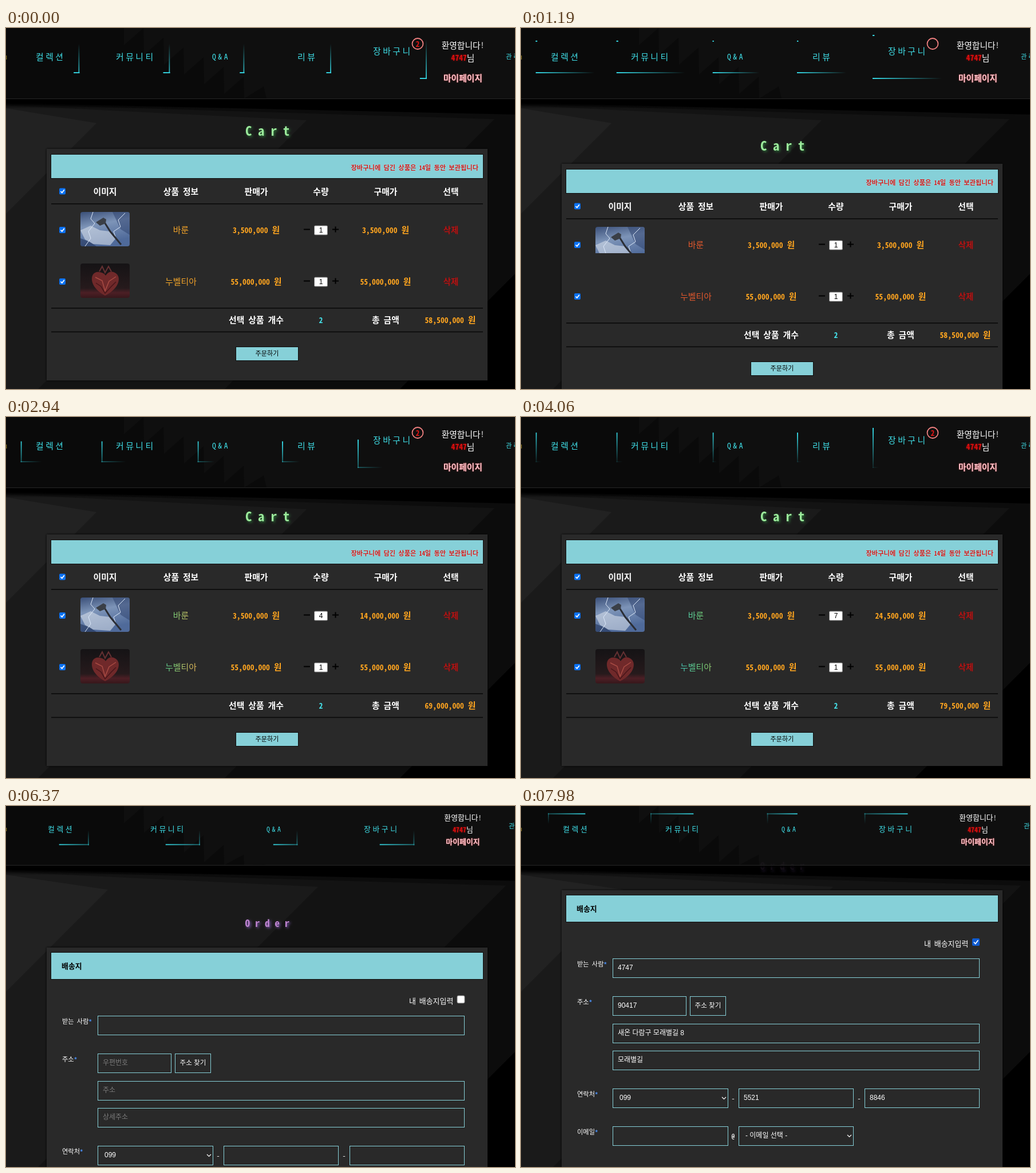
Write an HTML page with a canvas that moves like this. It is 889 by 630 pixels and loops after 8 s.

```html
<!DOCTYPE html>
<html lang="ko">
<head>
<meta charset="utf-8">
<title>Cart</title>
<style>
  html, body { margin: 0; width: 100%; height: 100%; overflow: hidden; background: #000; }
  canvas { display: block; width: 889px; height: 630px; }
</style>
</head>
<body>
<canvas id="stage" width="889" height="630"></canvas>
<script>
const ctx = document.getElementById('stage').getContext('2d');
const W = 889, H = 630, LOOP = 8000, STEP = 70, RATE = 20 / 21;
const RELOAD = 1190, READY = 1330, ORDER = 5880, ORDER_READY = 6020;
const MONO = '"Noto Sans Mono CJK KR", "Noto Sans CJK KR", monospace';
const SANS = '"Liberation Sans", "Noto Sans CJK KR", sans-serif';
const HANGUL_SCALE = 1 / 0.92; // makes a syllable exactly two Latin cells wide
const CYAN = '#3fdde6', AQUA = '#86d0d8', CARD = '#292929', GOLD = '#ffa51f';
const USER = '4747', STREET = '모래별길';

const clamp = (v, a = 0, b = 1) => Math.min(b, Math.max(a, v));
const smooth = (t, a, b) => { const p = clamp((t - a) / (b - a)); return p * p * (3 - 2 * p); };
const won = n => n.toLocaleString('en-US') + ' 원';

function rect(x, y, w, h, color) {
  ctx.fillStyle = color;
  ctx.fillRect(x, y, w, h);
}

function poly(color, ...pts) {
  ctx.fillStyle = color;
  ctx.beginPath();
  for (let i = 0; i < pts.length; i += 2) ctx.lineTo(pts[i], pts[i + 1]);
  ctx.fill();
}

function line(color, width, ...pts) {
  ctx.strokeStyle = color;
  ctx.lineWidth = width;
  ctx.beginPath();
  for (let i = 0; i < pts.length; i += 2) ctx.lineTo(pts[i], pts[i + 1]);
  ctx.stroke();
}

function text(s, x, y, size, color, o = {}) {
  const { weight = 400, font = MONO, align = 'left', gap = 0 } = o;
  ctx.save();
  ctx.textBaseline = 'middle';
  ctx.letterSpacing = gap + 'px';
  ctx.fillStyle = color;
  if (o.glow) {
    ctx.shadowColor = o.glow;
    ctx.shadowBlur = o.blur || 4;
    ctx.shadowOffsetX = ctx.shadowOffsetY = o.drop || 0;
  }
  const runs = String(s).match(/[가-힣]+|[^가-힣]+/g) || [];
  const setFont = run => {
    const scale = font === MONO && /[가-힣]/.test(run) ? HANGUL_SCALE : 1;
    ctx.font = `${weight} ${size * scale}px ${font}`;
  };
  const widths = runs.map(run => { setFont(run); return ctx.measureText(run).width; });
  const total = widths.reduce((a, b) => a + b, 0);
  if (align === 'center') x -= total / 2;
  if (align === 'right') x -= total;
  runs.forEach((run, i) => {
    setFont(run);
    ctx.fillText(run, x, y);
    x += widths[i];
  });
  ctx.restore();
}
const bold = (s, x, y, size, color, align = 'center', o = {}) =>
  text(s, x, y, size, color, { weight: 700, align, ...o });

// Milliseconds since the visible page was loaded
function pageAge(t) {
  if (t < RELOAD) return 525 + t * RATE;
  if (t < READY) return 7;
  if (t < ORDER) return 377 + (t - READY) * RATE;
  if (t < ORDER_READY) return 7;
  return 300 + (t - ORDER_READY) * RATE;
}

// Diagonal bands, cut off at the top by the header's shadow
function backdrop(head) {
  rect(0, 0, W, H, '#000');
  const bands = [[1318, '#0c0c0c', 8], [1012, '#131313', 10], [686, '#1a1a1a', 12], [324, '#222', 17]];
  for (const [d, c, top] of bands) {
    const y = head + top + 26;
    poly(c, 0, head + top, d - y, y, 0, d);
  }
}

function header(head) {
  const shade = ctx.createLinearGradient(0, head, 0, head + 18);
  shade.addColorStop(0, '#000');
  shade.addColorStop(0.45, 'rgba(0,0,0,.88)');
  shade.addColorStop(1, 'rgba(0,0,0,0)');
  rect(0, head, W, 18, shade);
  rect(0, 0, W, head, 'rgba(16,16,16,.96)');
  const teeth = [0, head, 0, 0, 206, 0];
  for (let i = 0; i < 7; i++) {
    const x = 206 + i * 35, y = i * 17;
    teeth.push(x, Math.min(head, y + 30), x + 34, Math.min(head, y));
  }
  teeth.push(455, head);
  poly('rgba(11,11,11,.9)', ...teeth);
  rect(0, head, W, 1, '#262626');
}

// Four bright segments chase each other around a box
function snake(x, y, w, h, age) {
  ctx.save();
  ctx.beginPath();
  ctx.rect(x, y, w, h);
  ctx.clip();
  const sides = [
    [x, y + 1, w, 0], [x + w - 1, y, 0, h],
    [x + w, y + h - 1, -w, 0], [x + 1, y + h, 0, -h]
  ];
  sides.forEach(([sx, sy, dx, dy], i) => {
    const local = age - 250 * i;
    if (local < 0 && i !== 2) return;
    const p = local < 0 ? 0.5 : Math.min(1, (local % 1000) / 500);
    const a = 2 * p - 1, b = 2 * p;
    const from = [sx + dx * a, sy + dy * a], to = [sx + dx * b, sy + dy * b];
    const g = ctx.createLinearGradient(...from, ...to);
    g.addColorStop(0, 'rgba(47,211,224,0)');
    g.addColorStop(1, '#35d6e2');
    line(g, 2, ...from, ...to);
  });
  ctx.restore();
}

function nav(items, size, age) {
  for (const [label, tx, x, y, w, h, ty] of items) {
    text(label, tx, ty, size, CYAN, { gap: 3.5 });
    snake(x, y, w, h, age);
  }
}

function greeting(x, size, rows) {
  text('환영합니다!', x, rows[0], size, '#fff', { align: 'center' });
  const left = x - size * 1.5;
  bold(USER, left, rows[1], size, '#dc1010', 'left', { glow: '#900', blur: 3 });
  text('님', left + size * 2, rows[1], size, '#fff');
  bold('마이페이지', x, rows[2], size, '#ffc4cc', 'center', { glow: '#a33', blur: 2 });
}

function checkbox(cx, cy, size, on, hover) {
  const r = size / 2;
  ctx.beginPath();
  ctx.roundRect(cx - r, cy - r, size, size, 2);
  ctx.fillStyle = on ? (hover ? '#0f5bd0' : '#0b72f5') : '#fff';
  ctx.fill();
  if (on) {
    line('#fff', 1.8, cx - r * .55, cy, cx - r * .12, cy + r * .45, cx + r * .6, cy - r * .5);
  } else {
    ctx.strokeStyle = hover ? '#555' : '#888';
    ctx.lineWidth = 1;
    ctx.stroke();
  }
}

const TINTS = [[224, 86, 44], [240, 166, 40], [214, 180, 92], [104, 204, 120], [54, 192, 208]];
function tint(u) {
  u = clamp(u, 0, 3.999);
  const i = Math.floor(u), f = u - i;
  return `rgb(${TINTS[i].map((v, k) => Math.round(v + (TINTS[i + 1][k] - v) * f))})`;
}

function productName(s, y, age) {
  const mid = 4.1 * (1 - Math.exp(-age / 2000));
  const slope = 0.027 * clamp(age / 1900) ** 2 * (age > 1900 ? Math.exp((1900 - age) / 3500) : 1);
  const g = ctx.createLinearGradient(278, 0, 333, 0);
  for (let i = 0; i <= 4; i++) g.addColorStop(i / 4, tint(mid - slope * 55 * (i / 4 - 0.5)));
  text(s, 305.5, y, 13.7, g, { align: 'center' });
}

function photo(y, shown, paint) {
  if (!shown) return;
  ctx.save();
  ctx.beginPath();
  ctx.roundRect(130, y, 86, 60, 4);
  ctx.clip();
  ctx.beginPath();
  ctx.rect(130, y, 86, shown);
  ctx.clip();
  ctx.translate(130, y);
  paint();
  ctx.restore();
}

function storm() {
  const g = ctx.createLinearGradient(0, 0, 12, 60);
  g.addColorStop(0, '#3a4f78');
  g.addColorStop(.45, '#7d94b8');
  g.addColorStop(1, '#4f6a9a');
  rect(0, 0, 86, 60, g);
  poly('rgba(214,222,234,.6)', 0, 32, 18, 24, 34, 32, 52, 34, 62, 46, 52, 58, 22, 56, 8, 48);
  poly('rgba(36,54,92,.6)', 0, 60, 0, 46, 16, 52, 28, 60);
  poly('rgba(44,64,108,.5)', 56, 0, 86, 0, 86, 40, 70, 30);
  line('#dce8f8', 1, 22, 0, 18, 12, 25, 20, 14, 34, 18, 46, 8, 60);
  line('#dce8f8', 1, 78, 2, 66, 14, 70, 26, 58, 34, 62, 46);
  line('#2b2e35', 3, 40, 15, 52, 34, 71, 57);
  poly('#3a3f47', 27, 18, 40, 10, 45, 13, 44, 20, 34, 24);
}

function heart() {
  const g = ctx.createLinearGradient(0, 0, 0, 60);
  g.addColorStop(0, '#151315');
  g.addColorStop(.72, '#261a1c');
  g.addColorStop(.85, '#4c1f25');
  g.addColorStop(1, '#37171b');
  rect(0, 0, 86, 60, g);
  ctx.beginPath();
  ctx.moveTo(43, 56);
  ctx.bezierCurveTo(12, 40, 16, 12, 33, 15);
  ctx.quadraticCurveTo(41, 16, 44, 21);
  ctx.quadraticCurveTo(50, 12, 58, 15);
  ctx.bezierCurveTo(73, 20, 70, 43, 43, 56);
  ctx.fillStyle = '#70292a';
  ctx.fill();
  line('#a94b43', 1.5, 26, 24, 38, 30, 43, 48, 50, 31, 62, 23);
  line('#481519', 1.5, 27, 34, 36, 40, 43, 52, 54, 40, 62, 32);
  line('#653032', 2, 33, 14, 38, 5, 43, 16, 49, 5, 54, 14);
}

function cartRow(y, name, price, qty, on, age) {
  checkbox(98.5, y, 11, on);
  productName(name, y, age);
  bold(won(price), 437, y, 13.7, GOLD);
  line('#000', 2, 520, y - 1, 531, y - 1);
  line('#000', 2, 570, y - 1, 581, y - 1);
  line('#000', 2, 575.5, y - 6, 575.5, y + 4);
  ctx.beginPath();
  ctx.roundRect(538.5, y - 7.5, 23, 16, 1.5);
  ctx.fillStyle = '#fff';
  ctx.fill();
  ctx.strokeStyle = '#777';
  ctx.lineWidth = 1;
  ctx.stroke();
  text(qty, 550, y + 1, 12, '#000', { align: 'center', font: SANS });
  bold(won(price * qty), 663, y, 13.7, GOLD);
  text('삭제', 777, y, 13.2, '#d01414', { align: 'center', glow: '#900', blur: 2 });
}

function card(top, h) {
  ctx.save();
  ctx.shadowColor = '#000';
  ctx.shadowBlur = 4;
  rect(71, top, 770, h, CARD);
  ctx.restore();
}

function plate(x, y, w, h) {
  rect(x - 1, y - 1, w + 2, h + 2, '#0f0f0f');
  rect(x, y, w, h, AQUA);
}

const CART_NAV = [
  ['컬렉션', 52, 25.5, 22, 103, 57, 50],
  ['커뮤니티', 192, 166.5, 22, 120, 57, 50],
  ['Q&A', 360, 334.5, 22, 82, 57, 50],
  ['리뷰', 509, 482, 22, 86, 57, 50],
  ['장바구니', 641, 614, 12, 121, 77, 40]
];

function cartPage(t, age) {
  const loading = t >= RELOAD && t < READY;
  const dy = t < RELOAD ? 0 : 26 - 32 * smooth(t, 1380, 1620);
  const clicks = [2240, 2520, 2800, 3080, 3360, 3640];
  const qty = 1 + clicks.filter(c => t >= c).length;
  const both = t < 4200;

  backdrop(123);
  ctx.save();
  ctx.translate(0, Math.round(dy));
  bold('Cart', 418, 179.5, 22.6, '#9bea9b', 'left', { gap: 10.7, glow: '#2b7038', blur: 4, drop: 2 });
  card(211, 404);
  plate(79, 221, 754, 41);
  bold('장바구니에 담긴 상품은 14일 동안 보관됩니다', 825, 244, 10.35, '#c81a1a', 'right',
    { glow: '#fff', blur: 1 });
  checkbox(98.5, 285, 11, both);
  const heads = [['이미지', 173], ['상품 정보', 305.5], ['판매가', 437], ['수량', 550], ['구매가', 663], ['선택', 777]];
  for (const [s, x] of heads) bold(s, x, 285, 13.7, '#fff');
  for (const y of [306, 488, 529.5]) rect(79, y, 754, 1.7, '#0b0b0b');
  photo(321, loading ? 46 : 60, storm);
  photo(411, loading ? 0 : 60, heart);
  cartRow(352.5, '바룬', 3500000, qty, true, age);
  cartRow(442.5, '누벨티아', 55000000, 1, both, age);
  bold('선택 상품 개수', 437, 509.5, 13.7, '#fff');
  bold(both ? 2 : 1, 550, 509.5, 13.7, '#45e2ea');
  bold('총 금액', 663, 509.5, 13.7, '#fff');
  bold(won(3500000 * qty + (both ? 55000000 : 0)), 776, 509.5, 13.7, GOLD);
  plate(402, 557, 108, 23);
  text('주문하기', 456, 568, 10.2, '#000', { align: 'center' });
  ctx.restore();

  header(123);
  nav(CART_NAV, 13.7, age);
  ctx.beginPath();
  ctx.arc(719, 27.5, 9.5, 0, 7);
  ctx.strokeStyle = '#f08080';
  ctx.lineWidth = 1.8;
  ctx.stroke();
  if (!loading) bold('2', 719, 28, 13.7, '#dc1414');
  greeting(798, 13.6, [30, 52, 87]);
  rect(0, 48, 1.3, 7, '#7c6a1c');
  text('관리', 873, 50, 10.35, CYAN, { gap: 3 });
}

const ORDER_NAV = [
  ['컬렉션', 73, 47, 12.5, 98, 56, 40],
  ['커뮤니티', 252, 226, 12.5, 113, 56, 40],
  ['Q&A', 455, 429.5, 12.5, 80, 56, 40],
  ['장바구니', 625, 599.5, 12.5, 114, 56, 40]
];

function field(x, y, w, s = '', hint = false) {
  ctx.strokeStyle = AQUA;
  ctx.lineWidth = 1;
  ctx.strokeRect(x + .5, y + .5, w - 1, 33);
  text(s, x + 9, y + 17, 12, hint ? '#7b7b7b' : '#fff', { font: SANS, weight: hint ? 400 : 500 });
}

function select(x, y, w, s) {
  field(x, y, w);
  text(s, x + 12, y + 17, 12, '#fff', { font: SANS, weight: 500 });
  line('#fff', 1.2, x + w - 11, y + 15, x + w - 7.5, y + 18.5, x + w - 4, y + 15);
}

function label(s, y, units) {
  text(s, 98, y, 10.35, '#fff');
  bold('*', 98 + units * 10.35, y + 1, 11, '#4a8df0', 'left');
}

function orderPage(t, age) {
  const filled = t >= 7770;
  const entry = (x, y, w, value, hint = '') =>
    field(x, y, w, filled ? value : hint, !filled);

  backdrop(103);
  ctx.save();
  ctx.translate(0, -Math.round(100 * smooth(t, 6390, 6630)));
  bold('Order', 417.5, 204, 17.3, '#c084d2', 'left', { gap: 8.6, glow: '#7b58b0', blur: 4, drop: 2 });
  card(247, 700);
  plate(79, 256, 754, 46);
  bold('배송지', 97, 279, 11.9, '#000', 'left');
  text('내 배송지입력', 704, 340, 11.9, '#fff');
  checkbox(794.5, 337.5, 13, filled, t >= 7350);
  label('받는 사람', 376, 4.5);
  entry(160, 366, 641, USER);
  label('주소', 442, 2);
  entry(160, 432, 129, '90417', '우편번호');
  field(295, 432, 63);
  text('주소 찾기', 326.5, 449, 11.6, '#fff', { font: SANS, weight: 500, align: 'center' });
  entry(160, 480, 641, `새온 다람구 ${STREET} 8`, '주소');
  entry(160, 527, 641, STREET, '상세주소');
  label('연락처', 603, 3);
  select(160, 593, 202, '099');
  text('-', 370.5, 610, 12, '#fff', { align: 'center' });
  entry(380, 593, 201, '5521');
  text('-', 590.5, 610, 12, '#fff', { align: 'center' });
  entry(600, 593, 201, '8846');
  label('이메일', 669, 3);
  field(160, 659, 202);
  bold('@', 370.5, 676, 11, '#fff');
  select(380, 659, 201, '- 이메일 선택 -');
  ctx.restore();

  header(103);
  nav(ORDER_NAV, 11.9, age);
  greeting(798, 11.9, [20, 41.5, 62.5]);
  rect(0, 38, 1.3, 6, '#7c6a1c');
  text('관리', 878, 35, 10.35, CYAN, { gap: 3 });
}

function draw(now) {
  const t = Math.floor((now % LOOP) / STEP) * STEP;
  const page = t < ORDER ? cartPage : orderPage;
  page(t, pageAge(t));
}

const start = performance.now();
function tick() {
  draw(performance.now() - start);
  requestAnimationFrame(tick);
}
tick();
</script>
</body>
</html>
```
